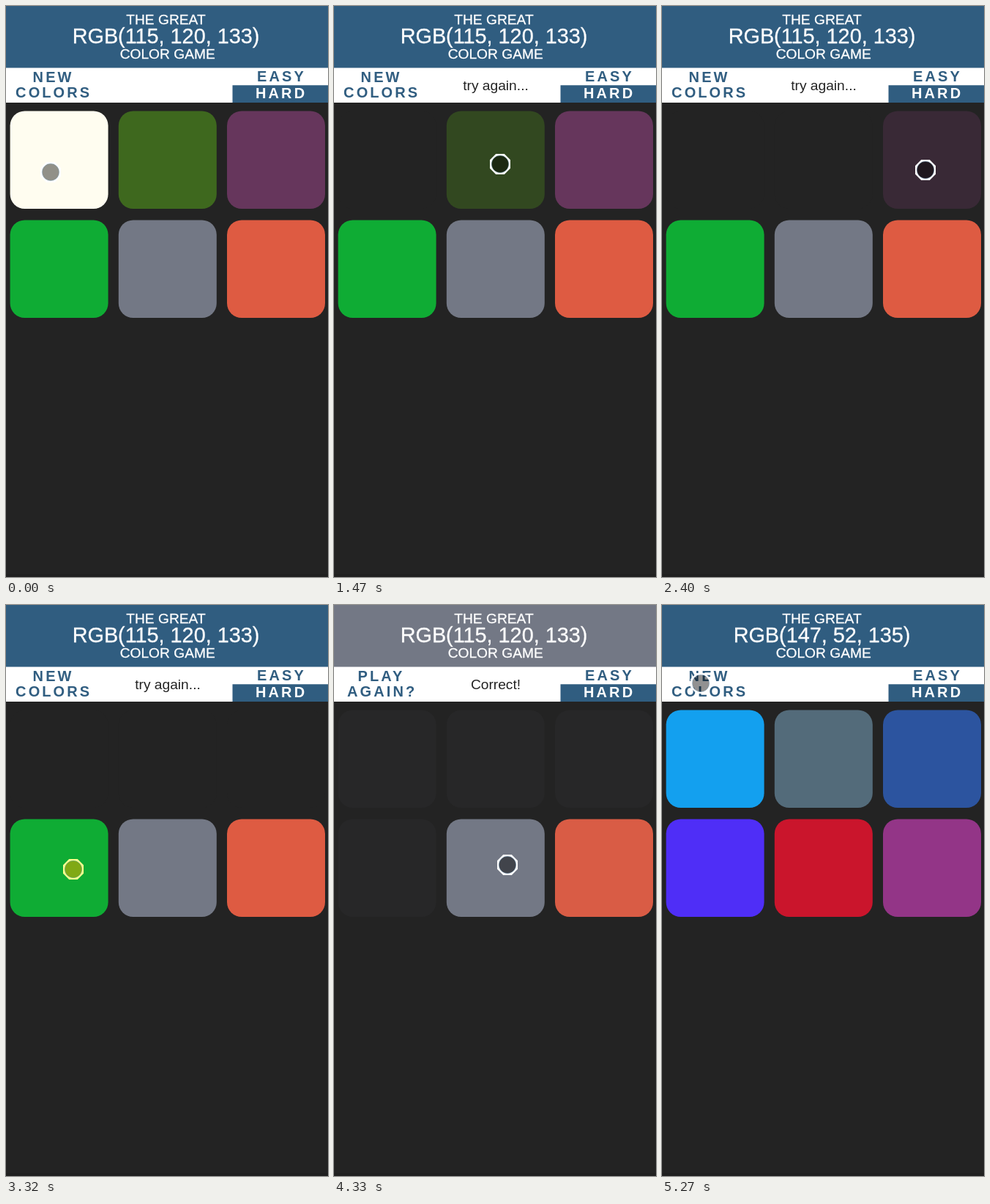
Recreate the animation shown at these times as an HTML page. Size 440x780 px, loop 5350 ms.

```html
<!DOCTYPE html>
<html lang="en">
<head>
<meta charset="utf-8">
<title>Color game</title>
<style>
  html, body { margin: 0; width: 100%; height: 100%; overflow: hidden; background: #232323; }
  svg { display: block; width: 100%; height: 100%; }
  text { font-family: "Liberation Sans", Arial, sans-serif; font-size: 19.2px; }
  .head { fill: #fff; stroke: #fff; stroke-width: .3px; text-anchor: middle; }
  .msg { fill: #232323; text-anchor: middle; }
  .btn { fill: #305d80; font-size: 20px; font-weight: bold; letter-spacing: 3.1px; }
</style>
</head>
<body>
<svg viewBox="0 0 440 780">
  <rect width="440" height="780" fill="#232323"/>
  <rect y="776" width="440" height="4" fill="#202020"/>
  <rect id="header" width="440" height="85"/>
  <text class="head" x="218.5" y="25">THE GREAT</text>
  <text class="head" id="goal" x="218.5" y="51" style="font-size:28.8px"></text>
  <text class="head" x="220.7" y="72">COLOR GAME</text>
  <rect y="84.5" width="440" height="47.5" fill="#fff"/>
  <rect x="309.5" y="108.25" width="130.5" height="23.75" fill="#305d80"/>
  <text class="btn" id="line1" y="104"></text>
  <text class="btn" id="line2" y="125"></text>
  <text class="msg" id="msg" x="221" y="115"></text>
  <text class="btn" x="343" y="103">EASY</text>
  <text class="btn" x="341" y="126" style="fill:#fff">HARD</text>
  <g id="tiles"></g>
  <g id="cursor">
    <circle id="disc" r="11.7"/>
    <path id="ring" fill-rule="evenodd"
      d="M-5.8-14H5.8L14-5.8V5.8L5.8 14H-5.8L-14 5.8V-5.8ZM-11.7 0a11.7 11.7 0 1 0 23.4 0a11.7 11.7 0 1 0-23.4 0Z"/>
    <circle r="11.7" fill="none" stroke="rgba(100,145,180,.4)"/>
  </g>
</svg>
<script>
const LOOP = 5350, STEP = 77.5, LEAD = 13; // the screen refreshes about 13 times a second
const FADE = 500, REST = 200, TRAVEL = 650;

const parse = hex => hex.match(/\w\w/g).map(h => parseInt(h, 16));
const before = '#fffdf0 #3e681e #66365c #0fac34 #737885 #de5b42'.split(' ').map(parse);
const after = '#12a0f0 #536b7a #2b549f #4f2df8 #cb142b #933487'.split(' ').map(parse);
const BG = parse('#232323'), BLUE = parse('#305d80'), GOAL = before[4];

// Taps: four misses on the first tiles, the hit, then a new game
const taps = [
  [30, 61, 227], [1335, 227, 216], [2205, 360, 224],
  [3445, 92, 361], [4307, 237, 355], [4837, 53, 107]
].map(([at, ...pos]) => ({ at, pos }));
const MISSES = 4;
const WIN = taps[MISSES].at, RESET = taps[MISSES + 1].at;

const $ = id => document.getElementById(id);
const tiles = before.map((_, i) => {
  const tile = document.createElementNS('http://www.w3.org/2000/svg', 'rect');
  const row = Math.floor(i / 3);
  const attrs = { x: 5.6 + 148.2 * (i % 3), y: 143.4 + 149 * row, width: 134, height: 133.6, rx: 20 };
  for (const k in attrs) tile.setAttribute(k, attrs[k]);
  return $('tiles').appendChild(tile);
});

const clamp = x => Math.min(1, Math.max(0, x));
const mix = (a, b, k) => a.map((v, i) => v + (b[i] - v) * k);
const rgb = c => `rgb(${c.map(Math.round).join(',')})`;
const easeOut = x => 1 - (1 - clamp(x)) ** 3;
const bezier = (p, a, b) => 3 * (1 - p) ** 2 * p * a + 3 * (1 - p) * p * p * b + p ** 3;

// The CSS "ease" curve, solved by bisection
function ease(x) {
  if (x <= 0 || x >= 1) return clamp(x);
  let lo = 0, hi = 1;
  for (let i = 0; i < 24; i++) {
    const mid = (lo + hi) / 2;
    if (bezier(mid, .25, .25) < x) lo = mid; else hi = mid;
  }
  return bezier(lo, .1, 1);
}

const fade = (a, b, t, start) => mix(a, b, ease((t - start) / FADE));

function tileColor(i, t) {
  if (t >= RESET) return fade(GOAL, after[i], t, RESET);
  const shown = i < MISSES ? fade(before[i], BG, t, taps[i].at) : before[i];
  return fade(shown, GOAL, t, WIN);
}

// Rest after each tap, then glide to the next one
function pointer(t) {
  return taps.slice(1).reduce((pos, tap, i) => {
    const start = taps[i].at + REST;
    const span = Math.min(TRAVEL, tap.at - start);
    return mix(pos, tap.pos, easeOut((t - start) / span));
  }, taps[0].pos);
}

function label(id, text, x) {
  $(id).textContent = text;
  if (x !== undefined) $(id).setAttribute('x', x);
}

function draw(time) {
  const t = Math.floor((time + LEAD) / STEP) * STEP;
  const won = t >= WIN && t < RESET;
  const missed = t >= taps[0].at && t < WIN;
  $('header').setAttribute('fill', rgb(won ? GOAL : BLUE));
  label('goal', `RGB(${(t < RESET ? GOAL : after[5]).join(', ')})`);
  label('line1', won ? 'PLAY' : 'NEW', won ? 32.6 : 36.6);
  label('line2', won ? 'AGAIN?' : 'COLORS', won ? 18 : 13.1);
  label('msg', won ? 'Correct!' : missed ? 'try again...' : '');
  tiles.forEach((tile, i) => tile.setAttribute('fill', rgb(tileColor(i, t))));

  const [x, y] = pointer(t).map(Math.round);
  const last = taps[MISSES - 1].at;
  const glow = t > last - 130 && t < last;
  $('cursor').setAttribute('transform', `translate(${x} ${y})`);
  $('disc').setAttribute('fill', glow ? '#80a914' : 'rgba(0,0,0,.43)');
  $('ring').setAttribute('fill', glow ? '#ffff8c' : '#fff');
}

const begin = performance.now();
function frame() {
  draw((performance.now() - begin) % LOOP);
  requestAnimationFrame(frame);
}
frame();
</script>
</body>
</html>
```
